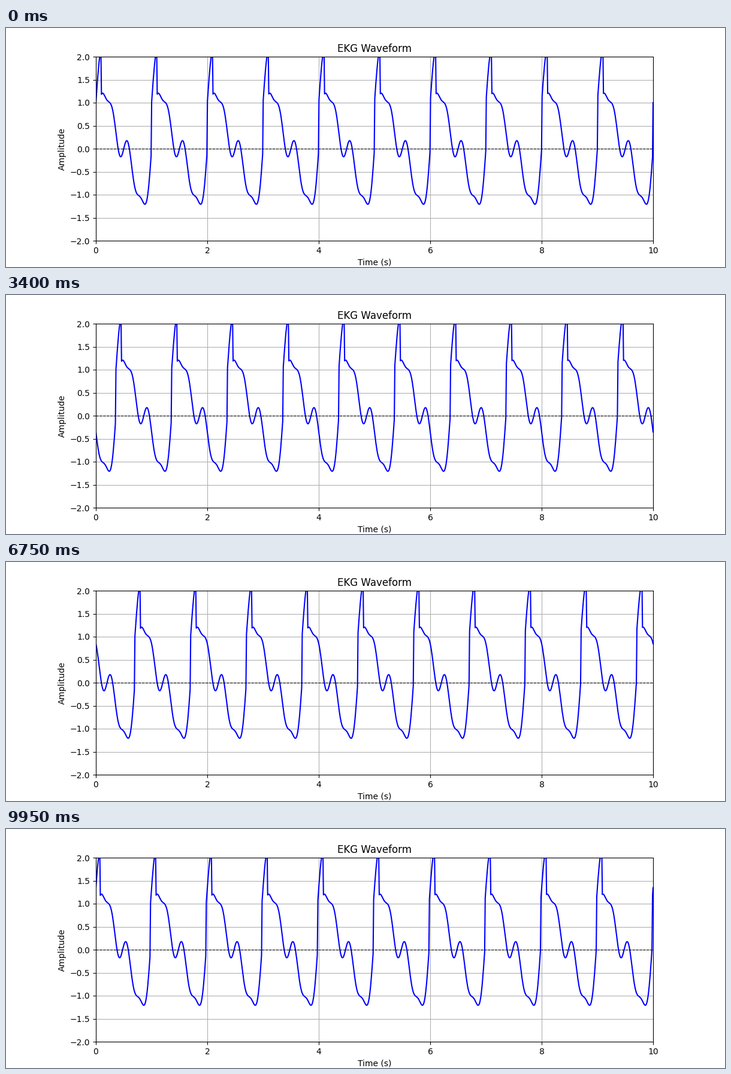
Animation of 1200x400 px, one loop 10000 ms. Source, as a matplotlib script:

```python
import numpy as np
import matplotlib.pyplot as plt
from matplotlib.animation import FuncAnimation

FRAMES = 200
INTERVAL = 50  # ms
STEP = 0.02    # seconds of scroll per frame


def ekg(t):
    """Three sine harmonics with a raised pulse at the start of each beat."""
    wave = (np.sin(2 * np.pi * t)
            + 0.5 * np.sin(4 * np.pi * t)
            + 0.2 * np.sin(8 * np.pi * t))
    return wave + np.where(t % 1 < 0.1, 1.0, 0.0)


time = np.linspace(0, 10, 1000)

fig, ax = plt.subplots(figsize=(12, 4), dpi=100)
line, = ax.plot(time, ekg(time), color="blue", lw=1.5)
ax.axhline(0, color="black", lw=0.8, ls="--")
ax.set_xlim(0, 10)
ax.set_ylim(-2, 2)
ax.set_title("EKG Waveform")
ax.set_xlabel("Time (s)")
ax.set_ylabel("Amplitude")
ax.grid(True)


def update(frame):
    line.set_ydata(ekg(time - STEP * frame))
    return line,


anim = FuncAnimation(fig, update, frames=FRAMES, interval=INTERVAL,
                     repeat=True, repeat_delay=0)
plt.show()
```
